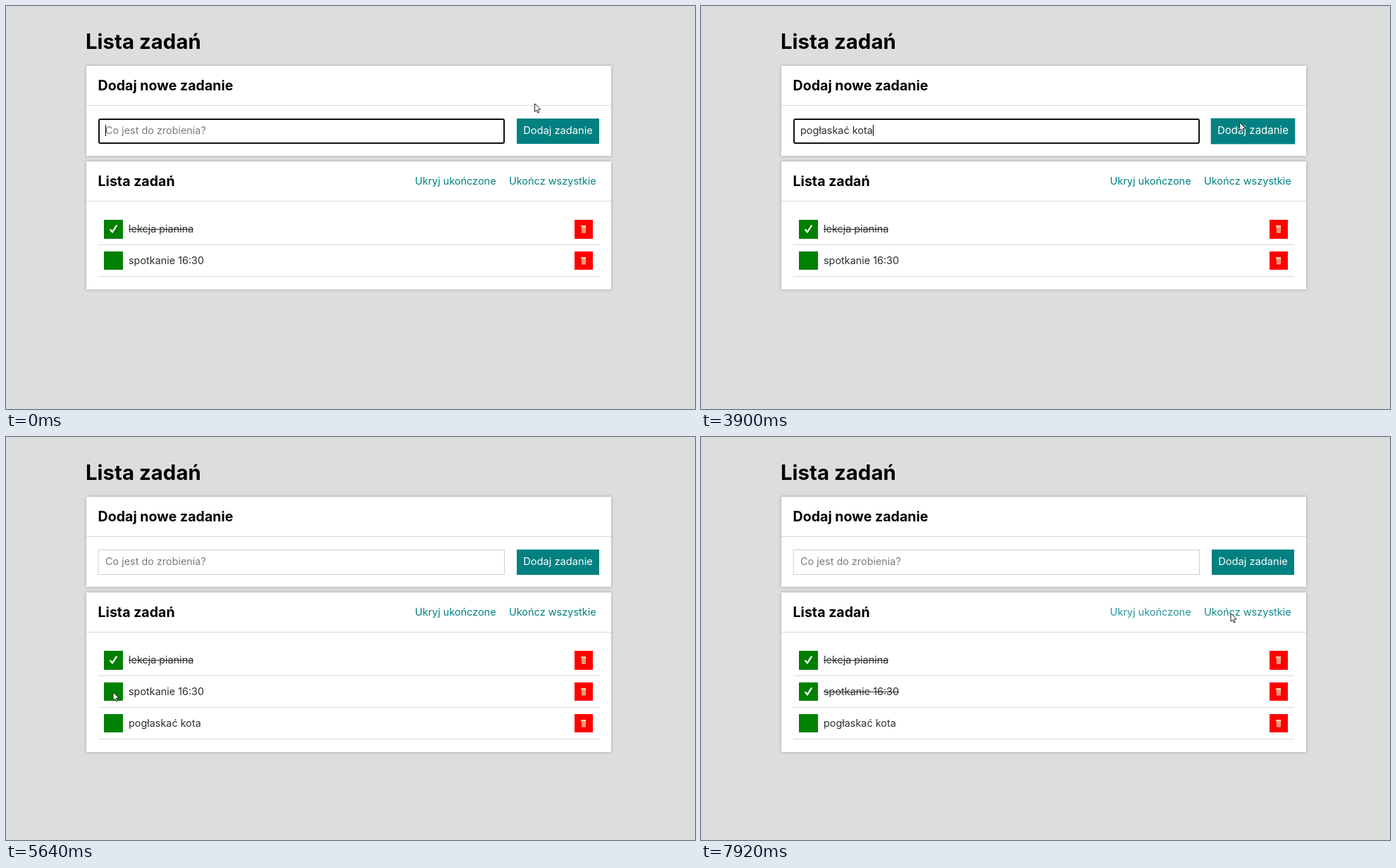
Recreate the animation shown at these times as an HTML page with a canvas. Size 978 px wide and 573 px high, loop 7990 ms.

```html
<!DOCTYPE html>
<html lang="pl">
<head>
<meta charset="utf-8">
<title>Lista zadań</title>
<style>
  html, body { margin: 0; width: 100%; height: 100%; overflow: hidden; background: #dcdedd; }
  canvas { display: block; width: 978px; height: 573px; }
</style>
</head>
<body>
<canvas id="stage"></canvas>
<script>
const W = 978, H = 573, LOOP = 7990, FADE = 500, ROW = 44.8;
const TEAL = [0, 128, 128], LIGHT = [90, 172, 186], LINE = '#dadada';
const canvas = document.getElementById('stage');
const ctx = canvas.getContext('2d');
const dpr = window.devicePixelRatio || 1;
canvas.width = W * dpr;
canvas.height = H * dpr;

const TASK = 'pogłaskać kota';
const TYPE_START = 500, KEY_GAP = 170, TYPE_END = 2760, BLINK = 530;
const BLUR = 4040, ADDED = 4110;

// pointer stops: time, x, y
const STOPS = [
  [3290, 750.5, 139], [4040, 768, 172], [4200, 768, 172], [4340, 576, 272],
  [4900, 157, 369], [5460, 142, 353], [5640, 152, 363], [5970, 152, 363],
  [6600, 637, 250], [7630, 637, 250], [7920, 752, 251]
];

const clamp = v => Math.max(0, Math.min(1, v));
const mix = (a, b, p) => a + (b - a) * p;
const blend = (a, b, p) => `rgb(${a.map((v, i) => Math.round(mix(v, b[i], p))).join(',')})`;
const within = (t, from, to) => t >= from && t < to;

// CSS "ease": cubic-bezier(.25, .1, .25, 1)
function ease(x) {
  const bezier = (a, b, s) => 3 * a * s * (1 - s) ** 2 + 3 * b * s * s * (1 - s) + s ** 3;
  let lo = 0, hi = 1;
  for (let i = 0; i < 18; i++) {
    const s = (lo + hi) / 2;
    if (bezier(.25, .25, s) < clamp(x)) lo = s; else hi = s;
  }
  return bezier(.1, 1, lo);
}

function hover(t, enter, leave) {
  const at = time => ease((time - enter) / FADE);
  return t < leave ? at(t) : at(leave) * (1 - ease((t - leave) / FADE));
}

function pointerAt(t) {
  let [, x, y] = STOPS[0];
  for (let i = 1; i < STOPS.length; i++) {
    const [t0] = STOPS[i - 1], [t1, x1, y1] = STOPS[i];
    const p = clamp((t - t0) / (t1 - t0));
    x = mix(x, x1, p);
    y = mix(y, y1, p);
  }
  return [x, y];
}

// edges snap to whole pixels
function box(x, y, w, h, color) {
  const left = Math.round(x), top = Math.round(y);
  ctx.fillStyle = color;
  ctx.fillRect(left, top, Math.round(x + w) - left, Math.round(y + h) - top);
}

function text(str, x, y, { size = 14.4, weight = 400, color = '#2c2c2c', align = 'left' } = {}) {
  ctx.font = `${weight} ${size}px Inter, "Open Sans", sans-serif`;
  ctx.textAlign = align;
  ctx.fillStyle = color;
  ctx.fillText(str, x, y);
  return ctx.measureText(str).width;
}

function shape(points, close) {
  ctx.beginPath();
  points.forEach(([x, y]) => ctx.lineTo(x, y));
  if (close) ctx.closePath();
}

function card(y, bottom, title) {
  ctx.save();
  ctx.shadowColor = 'rgba(0,0,0,.28)';
  ctx.shadowBlur = 4 * dpr;
  box(114, y, 745.3, bottom - y, '#fff');
  ctx.restore();
  box(114, y + 55.5, 745.3, 1, LINE);
  text(title, 130.5, y + 34.2, { size: 19.6, weight: 700, color: '#000' });
}

function input(t) {
  const focused = t < BLUR;
  const w = focused ? 2 : 1;
  ctx.lineWidth = w;
  ctx.strokeStyle = focused ? '#101010' : '#cfcfcf';
  ctx.beginPath();
  ctx.roundRect(131 + w / 2, 160 + w / 2, 577 - w, 36 - w, focused ? 2 : 0);
  ctx.stroke();

  const count = t < ADDED ? Math.max(0, Math.floor((t - TYPE_START) / KEY_GAP) + 1) : 0;
  const typed = TASK.slice(0, count);
  const width = text(typed, 141, 182);
  if (!typed) text('Co jest do zrobienia?', 141, 182, { color: '#7b7b7b' });

  const blinkOff = within(t, 220, TYPE_START) ||
    within(t, TYPE_END + BLINK, TYPE_END + 2 * BLINK);
  if (focused && !blinkOff) box(141 + width, 169, 1, 16, '#000');
}

function button(t) {
  const p = hover(t, 3845, 4325);
  ctx.save();
  ctx.translate(783.5, 178);
  ctx.scale(1 + .2 * p, 1 + .2 * p);
  ctx.fillStyle = blend(TEAL, [24, 138, 146], p);
  ctx.fillRect(-58.5, -18, 117, 36);
  text('Dodaj zadanie', 0, 4.2, { size: 14.7, color: '#fff', align: 'center' });
  ctx.restore();
}

function bin(x, y) {
  ctx.fillStyle = '#f0b08c';
  shape([[x - 3.2, y - 4], [x + 3.2, y - 4], [x + 2.7, y + 5.4], [x - 2.7, y + 5.4]], true);
  ctx.fill();
  box(x - 4, y - 5.4, 7, 2, '#f8cfb2');
  for (const dx of [-1.6, .6]) {
    ctx.fillStyle = '#d8705a';
    ctx.fillRect(x + dx, y - 2, .8, 6);
  }
}

function task(label, done, row) {
  const y = 304.4 + row * ROW;
  box(139.3, y, 26.6, 26.2, '#008000');
  if (done) {
    ctx.strokeStyle = '#fff';
    ctx.lineWidth = 2.3;
    ctx.lineCap = 'round';
    shape([[148.3, y + 13.8], [151, y + 17], [156.8, y + 8]]);
    ctx.stroke();
  }
  const width = text(label, 174, y + 17.6);
  if (done) box(174, y + 12.9, width, 1, '#2c2c2c');
  box(807.2, y, 25.8, 26.2, '#f00');
  bin(820, y + 13);
  box(131, y + 34.6, 711, 1, LINE);
}

function link(label, x, p) {
  text(label, x, 254, { size: 14.5, color: blend(TEAL, LIGHT, p), align: 'center' });
}

function list(t) {
  const secondDone = within(t, 5250, 5560) || t >= 5970;
  const hidden = within(t, 6770, 7100) || within(t, 7400, 7630);
  const tasks = [['lekcja pianina', true], ['spotkanie 16:30', secondDone]];
  if (t >= ADDED) tasks.push([TASK, false]);
  const shown = tasks.filter(([, done]) => !hidden || !done);

  card(221.4, 313.2 + shown.length * ROW, 'Lista zadań');
  link(hidden ? 'Pokaż ukończone' : 'Ukryj ukończone', hidden ? 634 : 638, hover(t, 6560, 7755));
  link('Ukończ wszystkie', 775.8, hover(t, 7850, LOOP));
  shown.forEach(([label, done], row) => task(label, done, row));
}

function pointer(t) {
  ctx.save();
  ctx.translate(...pointerAt(t));
  shape([[0, 0], [0, 11.3], [2.6, 9], [4.4, 13], [6.2, 12.2], [4.5, 8.3], [7.8, 8]], true);
  ctx.fillStyle = '#fff';
  ctx.strokeStyle = '#222';
  ctx.lineWidth = 1;
  ctx.fill();
  ctx.stroke();
  ctx.restore();
}

function draw(t) {
  ctx.setTransform(dpr, 0, 0, dpr, 0, 0);
  box(0, 0, W, H, '#dcdedd');
  text('Lista zadań', 113, 60.6, { size: 29.4, weight: 700, color: '#000' });
  card(85.4, 212.6, 'Dodaj nowe zadanie');
  list(t);
  input(t);
  button(t);
  pointer(t);
}

const start = performance.now();
function tick() {
  draw((performance.now() - start) % LOOP);
  requestAnimationFrame(tick);
}
tick();
</script>
</body>
</html>
```
